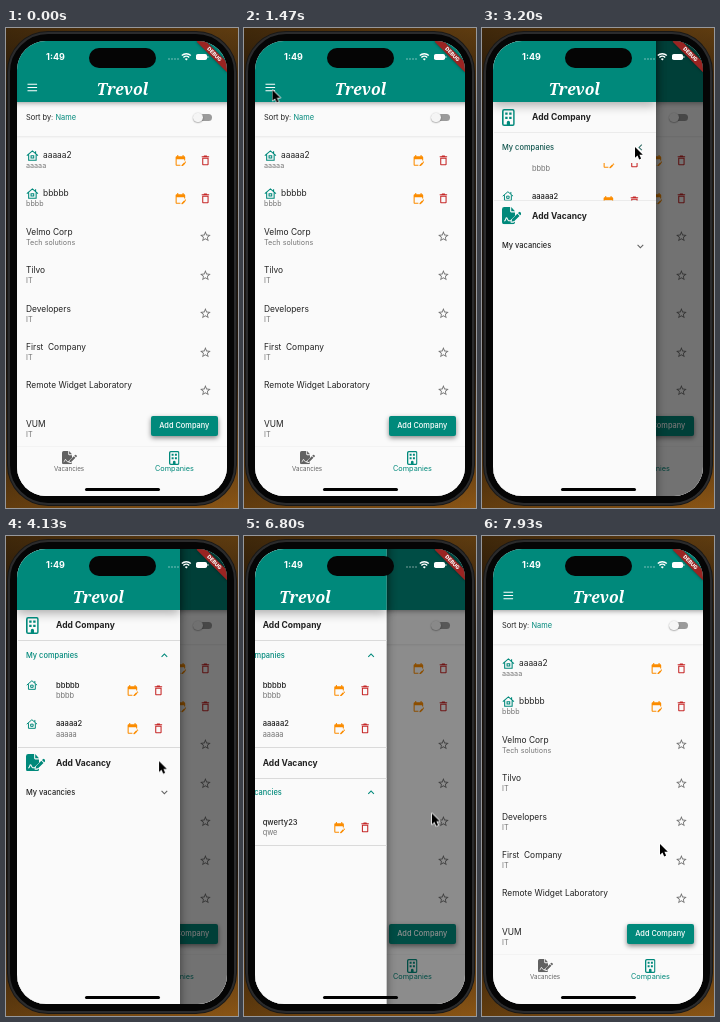
Animation of 232x480 px, one loop 8000 ms. Source, as an HTML page:

```html
<!DOCTYPE html>
<html lang="en">
<head>
<meta charset="utf-8">
<title>Job board app</title>
<style>
@property --p { syntax: "<number>"; inherits: true; initial-value: 0; }
@property --d { syntax: "<number>"; inherits: true; initial-value: 0; }

:root { --teal: #00897b; --ink: #212121; --grey: #757575; }
html, body { margin: 0; width: 100%; height: 100%; overflow: hidden; }
body {
  position: relative;
  background: linear-gradient(100deg, #0006, #0000), linear-gradient(#6a4312, #2b1c0d 20%, #24180d 70%, #8a5515);
  font-family: Inter, "Liberation Sans", sans-serif;
  color: var(--ink);
}
div, span, svg { position: absolute; box-sizing: border-box; }
.i { fill: currentColor; }

.phone {
  left: 2px; top: 4px; width: 228px; height: 473px;
  border: 2.5px solid #2b2b2c; border-radius: 40px;
  background: #050505; box-shadow: 0 0 0 1px #191817;
}
.screen {
  inset: 0; background: #fafafa;
  clip-path: inset(13px 11px 12px 11px round 29px);
  animation: drawer 8s linear infinite;
}
.t { line-height: 12px; white-space: pre; }
.b { font-weight: 700; }
.m { font-weight: 500; }
.bar { left: 0; right: 0; top: 0; height: 74px; background: var(--teal); box-shadow: 0 1px 5px #0006; }
.logo {
  left: 0; right: 0; top: 49px; text-align: center;
  font: italic 700 15.7px/24px "Noto Serif", "Liberation Serif", serif; color: #fff;
}
.home .logo { left: 1px; }
.home { inset: 0; }
.card { left: 11px; right: 11px; top: 74px; height: 34px; background: #fafafa; box-shadow: 0 1px 2px #00000014; }
.track { left: 189px; top: 85.7px; width: 17px; height: 7.5px; border-radius: 4px; background: #9b9b9b; }
.thumb { left: 187px; top: 84.7px; width: 9.6px; height: 9.6px; border-radius: 50%; background: #f5f5f5; box-shadow: 0 .6px 1.5px #0007; }
.button {
  left: 144.5px; top: 388.3px; width: 67.5px; height: 20px; border-radius: 2px;
  background: var(--teal); box-shadow: 0 2px 5px #0007;
  color: #fff; font-size: 7.4px; font-weight: 500; line-height: 20px; text-align: center;
}
.nav { left: 11px; right: 11px; top: 418px; height: 52px; background: #fafafa; border-top: 1px solid #f3f3f3; }
.scrim { inset: 0; background: #000; opacity: calc(var(--d) * .54); }

.drawer {
  left: 11px; top: 0; width: 162.7px; height: 480px; background: #fafafa;
  box-shadow: 0 0 9px #0007;
  transform: translateX(calc((var(--d) - 1) * 172px));
}
.drawer .bar { box-shadow: 0 3px 10px #0005; }
.menu { left: .5px; top: 74.4px; width: 162px; }
.row, .tile, .clip, .items, .item { position: relative; width: 162px; }
.row { height: 30px; }
.tile .row { height: 30.4px; color: color-mix(in srgb, var(--teal) calc(var(--p) * 100%), var(--ink)); }
.tile::before, .tile::after {
  content: ""; position: absolute; z-index: 1; left: 0; right: 0; height: 1px;
  background: #dadada; opacity: var(--p);
}
.tile::before { top: 0; }
.tile::after { bottom: 0; }
.tile .row .i { rotate: calc(var(--p) * 180deg); opacity: calc(.7 + .3 * var(--p)); }
.clip { height: calc(var(--p) * var(--n) * 38.4px); overflow: hidden; display: flex; align-items: center; }
.items { flex: none; height: calc(var(--n) * 38.4px); }
.item { height: 38.4px; }
.companies { --n: 2; animation: companies 8s linear infinite; }
.vacancies { --n: 1; animation: vacancies 8s linear infinite; }

.island { left: 83px; top: 20px; width: 67px; height: 19.5px; border-radius: 10px; background: #050505; }
.banner {
  left: 187.3px; top: 23.2px; width: 42.7px; height: 6.6px; rotate: 45deg;
  background: #9a2422; box-shadow: 0 0 3px #0007;
  color: #fff; font-size: 5.2px; font-weight: 800; line-height: 6.6px; text-align: center;
}
.pill { left: 79px; top: 460.3px; width: 74.5px; height: 3px; border-radius: 2px; background: #000; }
.cursor { left: 0; top: 1px; width: 10px; height: 15px; overflow: visible; animation: cursor 8s ease-in-out infinite; }

@keyframes drawer {
  0%, 18.75% {
    --d: 0;
    animation-timing-function: linear(0, .145, .387, .597, .748, .848, .91, .95, .973, .99, 1);
  }
  22.5% { --d: 1; }
  84.58% {
    --d: 1;
    animation-timing-function: linear(0, .145, .387, .597, .748, .848, .91, .95, .973, .99, 1);
  }
  88.33%, 100% { --d: 0; }
}
@keyframes companies {
  0%, 38.375% { --p: 0; animation-timing-function: ease-in; }
  40.875%, 100% { --p: 1; }
}
@keyframes vacancies {
  0%, 56.625% { --p: 0; animation-timing-function: ease-in; }
  59.125%, 100% { --p: 1; }
}
@keyframes cursor {
  0%, 8.375% { transform: translate(240px, 170px); }
  16.25%, 22.5% { transform: translate(28.5px, 61px); }
  27.5% { transform: translate(137px, 118.5px); animation-timing-function: ease-out; }
  29.125%, 42.5% { transform: translate(153px, 118px); }
  47.5%, 50% { transform: translate(153px, 206px); animation-timing-function: ease-in; }
  51.625% { transform: translate(153px, 224px); animation-timing-function: ease-out; }
  55%, 69.125% { transform: translate(153.5px, 256px); }
  71.625%, 95.875% { transform: translate(188px, 276.5px); }
  99.1%, 100% { transform: translate(178px, 307px); }
}
</style>
</head>
<body>
<svg width="0" height="0">
  <symbol id="house" viewBox="0 0 24 24"><path d="M1.500 12.500 12 3.500l10.500 9M5 10.500V21h14V10.500M18 4v4.500M9.500 12.500h5v4.500h-5z" fill="none" stroke="currentColor" stroke-width="2"/></symbol>
  <symbol id="edit" viewBox="0 0 24 24"><path d="M12 22H5c-1.1 0-2-.9-2-2V6c0-1.1.9-2 2-2h1V2h2v2h8V2h2v2h1c1.1 0 2 .9 2 2v6h-2v-2H5v10h7zm10.1-5 .7-.7c.4-.4.4-1 0-1.4l-.7-.7c-.4-.4-1-.4-1.4 0l-.7.7zm-.7.7-5.3 5.3H14v-2.1l5.3-5.3z"/></symbol>
  <symbol id="trash" viewBox="0 0 24 24"><path d="M6 19c0 1.1.9 2 2 2h8c1.1 0 2-.9 2-2V7H6zM8 9h8v10H8zm7.5-5-1-1h-5l-1 1H5v2h14V4z" fill-rule="evenodd"/></symbol>
  <symbol id="star" viewBox="0 0 24 24"><path d="m22 9.2-7.2-.6L12 2 9.2 8.6 2 9.2 7.5 14 5.8 21l6.2-3.7 6.2 3.7-1.7-7zm-10 6.2-3.8 2.3 1-4.3-3.3-2.9 4.4-.4L12 6.1l1.7 4 4.4.4-3.3 2.9 1 4.3z" fill-rule="evenodd"/></symbol>
  <symbol id="chevron" viewBox="0 0 24 24"><path d="M16.6 8.6 12 13.2 7.4 8.6 6 10l6 6 6-6z"/></symbol>
  <symbol id="building" viewBox="0 0 24 32">
    <path d="M4 0h16a4 4 0 0 1 4 4v24a4 4 0 0 1-4 4H4a4 4 0 0 1-4-4V4a4 4 0 0 1 4-4zm0 3a1 1 0 0 0-1 1v24q0 1 1 1h5v-4a3 3 0 0 1 6 0v4h5q1 0 1-1V4q0-1-1-1z" fill-rule="evenodd"/>
    <path d="M6 6.5h4.5V11H6zm7.5 0H18V11h-4.5zM6 14.5h4.5V19H6zm7.5 0H18V19h-4.5z"/>
  </symbol>
  <symbol id="sign" viewBox="0 0 36 32">
    <path d="M4 0h11v8q0 2 2 2h7v6l-8 8v5h5l3-2v1a4 4 0 0 1-4 4H4a4 4 0 0 1-4-4V4a4 4 0 0 1 4-4zm13 0 7 8h-7z"/>
    <path d="m29.500 11.200 1.700-1.700q1.300-1 2.600 0l1.500 1.500q1 1.300 0 2.600L33.600 15.300zM28.300 12.400l4.100 4.100-9.600 9.600-5.300 1.300 1.300-5.400z"/>
    <path d="M4 26q2 0 3-4t3 0 3 3.500h4" fill="none" stroke="#fafafa" stroke-width="2"/>
  </symbol>
</svg>

<div class="phone"></div>
<div class="screen">
  <div class="home" id="home"></div>
  <div class="scrim"></div>
  <div class="drawer" id="drawer"></div>
  <div class="banner">DEBUG</div>
  <div class="island"></div>
  <svg width="232" height="48" fill="#fff">
    <g opacity=".65"><circle cx="163" cy="31" r=".7"/><circle cx="166" cy="31" r=".7"/><circle cx="169" cy="31" r=".7"/><circle cx="172" cy="31" r=".7"/></g>
    <path d="M175.800 27.600a6.400 6.400 0 0 1 9 0M177.400 29.400a4.200 4.200 0 0 1 5.800 0" fill="none" stroke="#fff" stroke-width="1.400"/>
    <path d="m180.300 32.500-1.500-1.600a2.200 2.200 0 0 1 3 0z"/>
    <rect x="190" y="26" width="11" height="6" rx="1.800"/><rect x="201.500" y="28" width=".8" height="2"/>
  </svg>
  <span class="t b" style="left:40px;top:23px;font-size:9px;color:#fff">1:49</span>
  <div class="pill"></div>
</div>
<svg class="cursor" viewBox="0 0 10 15">
  <path d="M0 0v10.700l2.500-2.300 1.700 4 1.900-.8-1.700-3.900h3.400z" stroke="#fff" stroke-width="1.400" paint-order="stroke" stroke-linejoin="round"/>
</svg>

<script>
const TEAL = "var(--teal)", GREY = "var(--grey)", ORANGE = "#fb8c00", RED = "#c62828";

// Text is centred on y; icons are centred on (x, y).
const text = (s, x, y, size, color = "inherit", cls = "") =>
  `<span class="t ${cls}" style="left:${x}px;top:${y - 6}px;font-size:${size}px;color:${color}">${s}</span>`;
const icon = (id, x, y, color, w = 12.8, h = w) =>
  `<svg class="i" style="left:${x - w / 2}px;top:${y - h / 2}px;color:${color}" width="${w}" height="${h}"><use href="#${id}"/></svg>`;
const actions = (x, y) => icon("edit", x, y, ORANGE) + icon("trash", x + 25.5, y, RED);

const companies = [
  ["aaaaa2", "aaaaa", true], ["bbbbb", "bbbb", true],
  ["Velmo Corp", "Tech solutions"], ["Tilvo", "IT"], ["Developers", "IT"],
  ["First  Company", "IT"], ["Remote Widget Laboratory", ""], ["VUM", "IT"],
];
const listRow = ([name, field, own], i) => {
  const y = 127 + i * 38.4;
  return text(name, own ? 37 : 20, y, 8.4) + text(field, 20, y + 11, 7.2, GREY) +
    (own ? icon("house", 26.3, y, TEAL) + actions(174, y + 5) : icon("star", 199.5, y + 5, GREY));
};

const brand = `<div class="bar"></div><div class="logo">Trevol</div>`;
const burger = `<svg width="40" height="70"><path d="M21.5 56.3h9.6m-9.6 3.2h9.6m-9.6 3.2h9.6" stroke="#fff" stroke-width="1.1"/></svg>`;

document.getElementById("home").innerHTML =
  `<div class="card"></div>${brand}${burger}` +
  text("Sort by: ", 20, 89.5, 7.4) + text("Name", 49.5, 89.5, 7.4, TEAL) +
  `<div class="track"></div><div class="thumb"></div>` +
  companies.map(listRow).join("") +
  `<div class="nav"></div><div class="button">Add Company</div>` +
  icon("sign", 63.5, 430, "#616161", 15, 13.3) + text("Vacancies", 48, 441, 6.2, "#616161") +
  icon("building", 168.5, 430, TEAL, 10.5, 14) + text("Companies", 149, 441, 7.3, TEAL);

const addRow = (label, img) => `<div class="row">${img}${text(label, 38.5, 15, 8.5, "inherit", "b")}</div>`;
const item = ([name, field]) => `<div class="item">` + icon("house", 14.8, 14.5, TEAL, 11.8) +
  text(name, 38.5, 15, 7.6, "inherit", "m") + text(field, 38.5, 25.5, 7.4, GREY) + actions(115, 19.2) + `</div>`;
const tile = (cls, label, items) => `<div class="tile ${cls}">
  <div class="row">${text(label, 8.5, 15.4, 7.45, "inherit", "m")}${icon("chevron", 146.7, 15.2, "currentColor")}</div>
  <div class="clip"><div class="items">${items.map(item).join("")}</div></div></div>`;

document.getElementById("drawer").innerHTML = brand + `<div class="menu">` +
  addRow("Add Company", icon("building", 14.8, 15, TEAL, 12.8, 17)) +
  tile("companies", "My companies", [["bbbbb", "bbbb"], ["aaaaa2", "aaaaa"]]) +
  addRow("Add Vacancy", icon("sign", 18, 15, TEAL, 19.5, 17.3)) +
  tile("vacancies", "My vacancies", [["qwerty23", "qwe"]]) + `</div>`;
</script>
</body>
</html>
```
